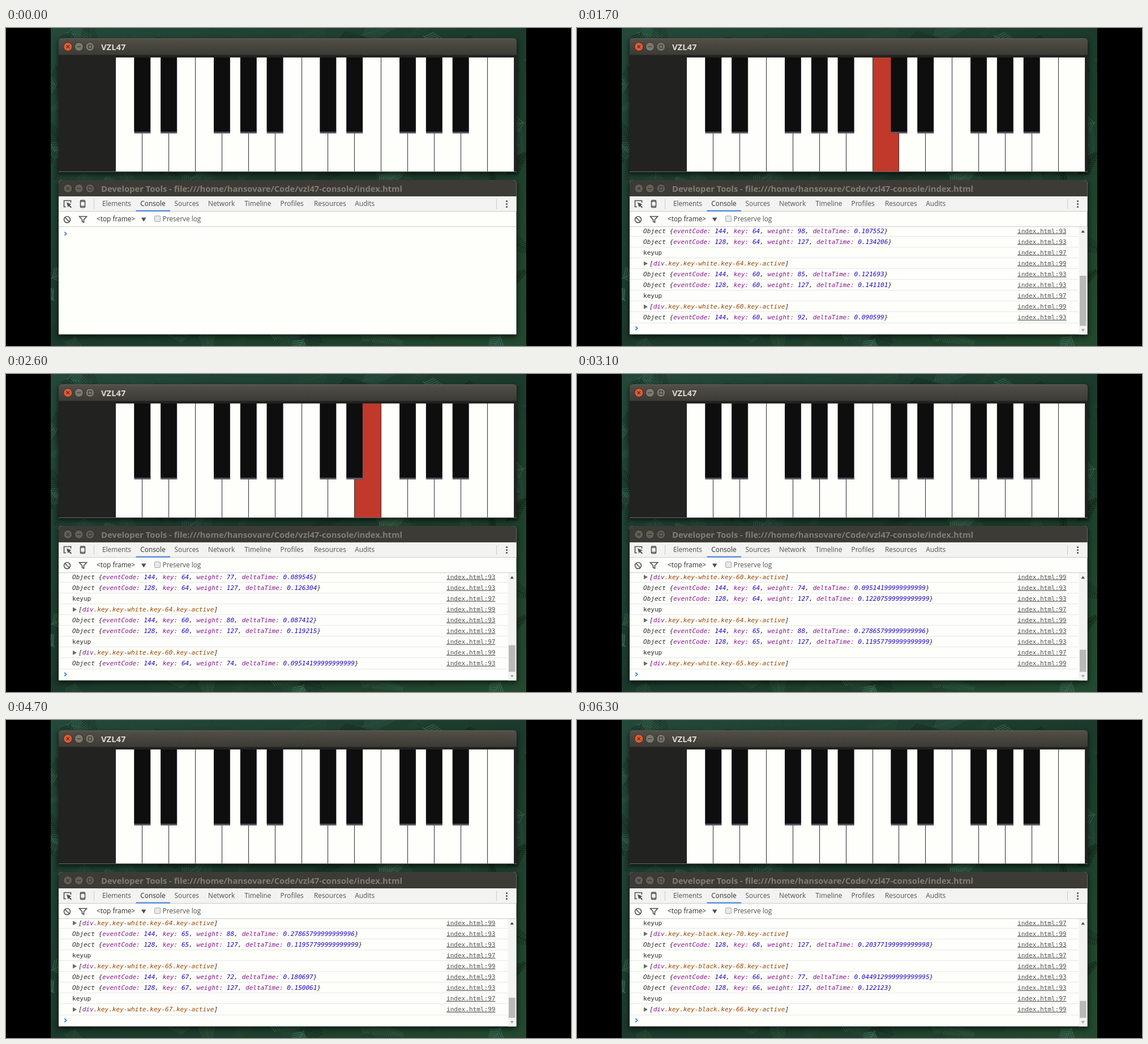
These frames come from a looping animation (998 by 561 pixels, 6.5 s). An HTML page:

```html
<!DOCTYPE html>
<html lang="en">
<head>
<meta charset="utf-8">
<title>VZL47</title>
<style>
  html, body { margin: 0; width: 100%; height: 100%; overflow: hidden; background: #000; }
  svg { display: block; width: 998px; height: 561px; }
  text { white-space: pre; }
  .title { font: bold 14.75px "Open Sans", sans-serif; }
  .ui text { font: 11.85px "Open Sans", sans-serif; fill: #505050; }
  .ui .on { fill: #2c2c2c; }
  #log text { font: 11.05px "DejaVu Sans Mono", monospace; fill: #2a2a2a; }
  #log .it { font-style: italic; }
  #log .name { fill: #881391; }
  #log .num { fill: #1c00cf; }
  #log .cls { fill: #994500; }
  #log .link { fill: #545454; text-decoration: underline; }
</style>
</head>
<body>
<svg viewBox="0 0 998 561">
  <defs>
    <linearGradient id="bar" x2="0" y2="1">
      <stop offset="0" stop-color="#5b594f"/>
      <stop offset=".1" stop-color="#504e46"/>
      <stop offset="1" stop-color="#3b3a35"/>
    </linearGradient>
    <linearGradient id="wood" x2="1" y2="1">
      <stop offset="0" stop-color="#24483a"/>
      <stop offset=".5" stop-color="#1b3a2b"/>
      <stop offset="1" stop-color="#23492f"/>
    </linearGradient>
    <filter id="soft" x="-5%" y="-5%" width="110%" height="115%">
      <feGaussianBlur stdDeviation="5"/>
    </filter>
    <clipPath id="desk"><rect x="79" width="840" height="561"/></clipPath>
    <clipPath id="view"><rect x="93" y="351" width="808.5" height="189.5"/></clipPath>
  </defs>
  <rect width="998" height="561"/>
  <g clip-path="url(#desk)">
    <rect x="79" width="840" height="561" fill="url(#wood)"/>
    <g id="ferns" fill="none" stroke-linecap="round"></g>
    <g filter="url(#soft)" opacity=".6">
      <rect x="92" y="22" width="811" height="237"/>
      <rect x="92" y="272" width="811" height="273"/>
    </g>
  </g>

  <path d="M93 253.5V24q0-6 6-6H896q6 0 6 6V253.5z" fill="#222220"/>
  <path d="M93 47.5V24q0-6 6-6H896q6 0 6 6V47.5z" fill="url(#bar)"/>
  <g id="topButtons"></g>
  <text class="title" x="168" y="39" fill="#dfdbd2">VZL47</text>
  <g id="keys"></g>
  <path d="M93 253.5H902" stroke="#6b6b66"/>

  <path d="M93 540.5V274q0-6 6-6H895.500q6 0 6 6V540.5z" fill="#fefefa"/>
  <path d="M93 297V274q0-6 6-6H895.500q6 0 6 6V297z" fill="#3c3b36"/>
  <g id="lowButtons"></g>
  <text class="title" x="168" y="288.500" fill="#817e76">Developer Tools - file:///home/hansovare/Code/vzl47-console/index.html</text>

  <g class="ui">
    <rect x="93" y="297" width="808.5" height="26" fill="#f3f3f1"/>
    <path d="M93 323.5H901.5M93 350.5H901.5M155.500 302V319M866.500 302V319" stroke="#cbcbc9"/>
    <rect x="229.500" y="321.500" width="60.500" height="2" fill="#3f83dd"/>
    <g id="tabs"></g>
    <g fill="none" stroke="#4f4f4f" stroke-width="1.6">
      <path d="M106 315.500H102.500V304.500H114.500V308"/>
      <rect x="131.500" y="304" width="8" height="12.500" rx="1.500"/>
      <path d="M131.500 306H139.500M131.500 314.500H139.500"/>
      <circle cx="108" cy="338" r="5.500"/>
      <path d="M104 334L112 342"/>
      <path d="M129.500 332.500H142.500L137.500 338V343L134.500 341.500V338z"/>
    </g>
    <path d="M107 307.500L115.500 311L112.500 312.500L116 316L114.500 317.500L111 314L109.500 316.500z" fill="#4f4f4f"/>
    <g fill="#4f4f4f">
      <circle cx="884.500" cy="305.500" r="1.600"/><circle cx="884.500" cy="310.500" r="1.600"/><circle cx="884.500" cy="315.500" r="1.600"/>
      <path d="M239 334.500H247.500L243.200 341.500z"/>
    </g>
    <text class="on" x="160" y="341">&lt;top frame&gt;</text>
    <rect x="262.500" y="331.500" width="10" height="10" rx="1.500" fill="#e9e9e7" stroke="#a9a9a7"/>
    <text x="276.500" y="341">Preserve log</text>
  </g>
  <g clip-path="url(#view)"><g id="log"></g></g>
</svg>
<script>
const LOOP = 6500, STEP = 100, LAST = 6300;
const START = 740, LIGHT_LAG = 20, BLACK_LOG_LAG = 60;
const ROW = 19.06, VIEW = 189.5;
const $ = id => document.getElementById(id);

// [key, weight (0 = release), seconds since the previous event]
const MIDI = [
  [60, 87, 0], [60, 0, 0.121545],
  [62, 92, 0.08165299999999999], [62, 0, 0.12214499999999999],
  [64, 98, 0.107552], [64, 0, 0.134206],
  [60, 85, 0.121693], [60, 0, 0.141101],
  [60, 92, 0.090599], [60, 0, 0.126115],
  [62, 99, 0.092538], [62, 0, 0.12118999999999999],
  [64, 77, 0.089545], [64, 0, 0.126304],
  [60, 80, 0.087412], [60, 0, 0.119215],
  [64, 74, 0.09514199999999999], [64, 0, 0.12207599999999999],
  [65, 88, 0.27865799999999996], [65, 0, 0.11957799999999999],
  [67, 72, 0.180697], [67, 0, 0.150061],
  [54, 81, 1.450618], [54, 0, 0.151204],
  [56, 87, 0.001], [58, 72, 0.171642],
  [56, 0, 0.007995], [58, 0, 0.147615],
  [70, 76, 0.172031], [68, 79, 0.168114],
  [70, 0, 0.061702], [68, 0, 0.20377199999999998],
  [66, 77, 0.044912999999999995], [66, 0, 0.122123]
];
const isBlack = key => [1, 3, 6, 8, 10].includes(key % 12);

let clock = START;
const events = MIDI.map(([key, weight, delta]) => {
  clock += delta * 1000;
  return { key, weight, delta, at: clock, logAt: clock + (isBlack(key) ? BLACK_LOG_LAG : 0) };
});

const span = (cls, s) => `<tspan class="${cls}">${s}</tspan>`;
const objectLine = e => {
  const fields = { eventCode: e.weight ? 144 : 128, key: e.key, weight: e.weight || 127, deltaTime: e.delta };
  const body = Object.entries(fields).map(([k, v]) => span("name", k + ":") + " " + span("num", v));
  return { kind: "it", body: `Object {${body.join(", ")}}`, num: 93 };
};
const lines = [];
for (const e of events) {
  const add = line => lines.push({ ...line, at: e.logAt });
  add(objectLine(e));
  if (e.weight) continue;
  const cls = `.key.key-${isBlack(e.key) ? "black" : "white"}.key-${e.key}.key-active`;
  add({ kind: "", body: "keyup", num: 97 });
  add({ kind: "it", body: "[" + span("name", "div") + span("cls", cls) + "]", num: 99, node: true });
}

function drawFerns() {
  let seed = 41, out = "";
  const rnd = (a, b) => {
    seed = (seed * 16807) % 2147483647;
    return a + (b - a) * seed / 2147483647;
  };
  for (let i = 0; i < 190; i++) {
    const x = rnd(70, 925), y = rnd(-10, 570), dir = rnd(0, 6.28), len = rnd(35, 85);
    const pt = (r, a, d) => `${(x + r * Math.cos(dir) + d * Math.cos(dir + a)).toFixed(1)} ${(y + r * Math.sin(dir) + d * Math.sin(dir + a)).toFixed(1)}`;
    let d = `M${pt(0, 0, 0)}L${pt(len, 0, 0)}`;
    for (let r = 3; r < len; r += 4.5) {
      const leaf = 4 + 15 * (1 - r / len);
      d += `M${pt(r, 0.9, leaf)}L${pt(r, 0, 0)}L${pt(r, -0.9, leaf)}`;
    }
    const light = rnd(8, 39);
    out += `<path d="${d}" stroke="hsl(${rnd(140, 160)},28%,${light}%)" stroke-width="${rnd(1, 2.4)}" opacity=".6"/>`;
  }
  $("ferns").innerHTML = out;
}

function buttons(y, fills, ink, edge) {
  const marks = ["M-2.500-2.500L2.500 2.500M2.500-2.500L-2.500 2.500", "M-3.500 0H3.500", "M-2.800-2.800H2.800V2.800H-2.800z"];
  return marks.map((d, i) => `<g transform="translate(${109.3 + i * 19.5} ${y})">
    <circle r="7.600" fill="${fills[i]}" stroke="${edge}"/><path d="${d}" fill="none" stroke="${ink}" stroke-width="1.200"/></g>`).join("");
}

function drawKeys() {
  const W = 46.87, X = 194;
  let whites = "", blacks = "", n = 0;
  for (let key = 48; key <= 72; key++) {
    const x = X + n * W;
    if (isBlack(key)) {
      const bx = (x - 14.5).toFixed(1);
      blacks += `<rect x="${bx}" y="52" width="29" height="134" fill="#5d5662"/>
        <rect id="k${key}" x="${bx}" y="52" width="28.500" height="131" fill="#0e0e0e"/>`;
    } else {
      whites += `<rect id="k${key}" x="${x.toFixed(2)}" y="52" width="${W}" height="201.500" fill="#fefefa"/>`;
      if (n) whites += `<path d="M${Math.floor(x) + .5} 52V253.500" stroke="#3b3b3b" stroke-width="1.100"/>`;
      n++;
    }
  }
  // redraw dividers above the fills
  const div = [...whites.matchAll(/<path[^>]*>/g)].map(m => m[0]).join("");
  $("keys").innerHTML = whites.replace(/<path[^>]*>/g, "") + div + blacks;
}

function drawTabs() {
  const tabs = { Elements: 170, Console: 237.3, Sources: 297.5, Network: 357, Timeline: 421.3, Profiles: 484.5, Resources: 544, Audits: 616.3 };
  $("tabs").innerHTML = Object.entries(tabs).map(([s, x]) =>
    `<text x="${x}" y="314" ${s === "Console" ? 'class="on"' : ""}>${s}</text>`).join("");
}

function drawLog(t) {
  const n = lines.filter(l => l.at <= t).length;
  const scroll = Math.max(0, n * ROW + 362 - 529.6);
  const rowY = i => 362 + i * ROW - scroll;
  let out = "";
  for (let i = Math.max(0, n - 10); i < n; i++) {
    const { kind, body, num, node } = lines[i], y = rowY(i), base = (y + 3.4).toFixed(1);
    const rule = Math.round(y + 9) + .5;
    out += `<path d="M93 ${rule}H${scroll ? 886 : 901}" stroke="#e6e6ec"/>`;
    if (node) out += `<path d="M118 ${y - 3.8}L125 ${y + .2}L118 ${y + 4.2}z" fill="#6a6a6a"/>`;
    out += `<text class="${kind}" x="${node ? 128 : 117}" y="${base}">${body}</text>`;
    out += `<text class="link" x="${scroll ? 778 : 792}" y="${base}">index.html:${num}</text>`;
  }
  const py = n ? rowY(n) : 362.8;
  out += `<path d="M103.300 ${py - 3}L106.800 ${py + .2}L103.300 ${py + 3.4}" fill="none" stroke="#3a7fe0" stroke-width="1.700"/>`;
  if (scroll) {
    const size = Math.max(30, 162 * VIEW / (n * ROW + 23));
    out += `<rect x="886.500" y="351" width="15" height="190" fill="#f3f3f1"/>
      <path d="M890.500 361L893.800 356.500L897 361z" fill="#4c4c4c"/>
      <path d="M890.500 531L893.800 535.500L897 531z" fill="#a5a5a5"/>
      <rect x="888" y="${525.5 - size}" width="11.500" height="${size}" fill="#b9b9b7"/>`;
  }
  $("log").innerHTML = out;
}

function lightKeys(t) {
  const held = new Set();
  for (const e of events) {
    if (e.at + LIGHT_LAG > t) break;
    e.weight ? held.add(e.key) : held.delete(e.key);
  }
  for (let key = 48; key <= 72; key++)
    $("k" + key).setAttribute("fill", held.has(key) ? "#c0392b" : isBlack(key) ? "#0e0e0e" : "#fefefa");
}

drawFerns();
drawKeys();
drawTabs();
$("topButtons").innerHTML = buttons(33, ["#e5592f", "#7c796f", "#7c796f"], "#36342f", "#34322d");
$("lowButtons").innerHTML = buttons(283, ["#625f58", "#625f58", "#625f58"], "#35342f", "#302f2b");

let shown = -1;
function frame() {
  const t = Math.min(LAST, Math.floor(performance.now() % LOOP / STEP) * STEP);
  if (t !== shown) {
    shown = t;
    lightKeys(t);
    drawLog(t);
  }
  requestAnimationFrame(frame);
}
frame();
</script>
</body>
</html>
```
